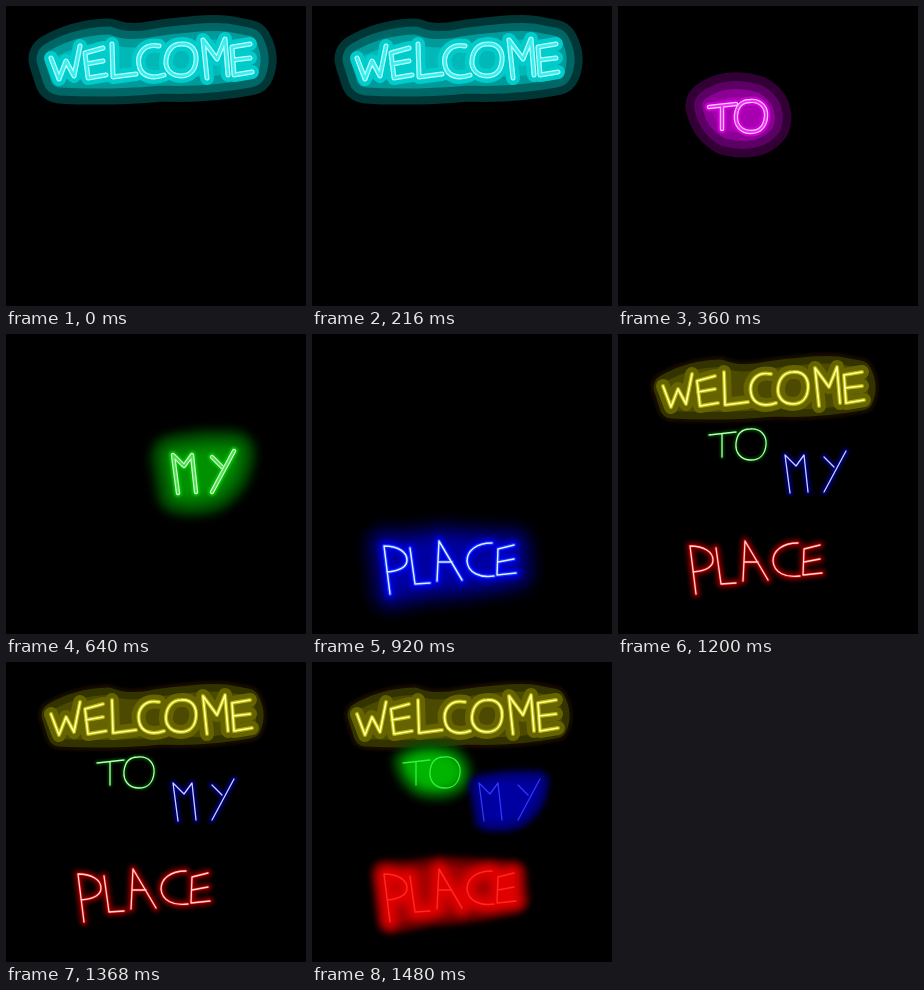
Animation of 300x300 px, one loop 1760 ms. Source, as an HTML page:

```html
<!DOCTYPE html>
<html lang="en">
<head>
<meta charset="utf-8">
<title>Neon sign</title>
<style>
html, body { margin: 0; width: 100%; height: 100%; overflow: hidden; background: #000; }
svg { display: block; width: 100vw; height: 100vh; }
path { fill: none; stroke-linecap: round; stroke-linejoin: round; }
</style>
</head>
<body>
<svg id="stage" viewBox="0 0 300 300"></svg>
<script>
const NS = 'http://www.w3.org/2000/svg';
const LOOP = 1760;
const stage = document.getElementById('stage');

// The lines of each word, and the outline its halo grows from
const words = {
  welcome: {
    line: 'M45 52L53 73L60 55L68 70L74 40' +
      'M97 42L79 47L82 72L100 69M80 58L97 55' +
      'M106 38L107 71L130 68' +
      'M153 40C137 37 131 49 133 59C135 71 147 73 158 69' +
      'M175 38C186 37 191 45 190 55C189 65 183 70 175 70C165 70 159 63 160 54C161 44 167 38 175 38Z' +
      'M201 72L197 34L211 53L219 33L222 69' +
      'M244 38L226 41L228 69L246 66M227 54L244 52',
    halo: 'M48 53Q72 39 102 38Q122 46 150 40Q200 33 220 35L241 39Q248 52 243 64Q200 72 155 70Q100 75 54 72Z'
  },
  to: {
    line: 'M91 101L118 98M104 100L104 123' +
      'M132 95C143 94 149 102 148 111C147 121 141 126 133 126C123 126 117 119 118 109C119 100 124 95 132 95Z',
    halo: 'M93 100Q110 87 137 95Q151 103 147 117Q137 130 110 124Q97 117 93 100Z'
  },
  my: {
    line: 'M172 159L167 121L178 132L186 121L190 158M206 123L216 133M228 117L206 158',
    halo: 'M167 123Q195 117 227 119Q225 144 206 156Q190 162 173 158Z'
  },
  place: {
    line: 'M78 260L72 212C86 212 95 218 95 226C95 234 86 237 75 238' +
      'M98 214L103 250L118 249' +
      'M125 247L127 207L150 246M126 228L140 228' +
      'M180 209C164 209 155 217 155 227C156 239 168 244 182 242' +
      'M202 211L186 215L185 241L204 239M186 228L202 225',
    halo: 'M73 212Q100 214 127 208Q165 211 201 212L203 238Q160 248 118 250L79 258Z'
  }
};

// Halo layers: reach, colour, blur. Line layers: width, colour, blur.
const yellowSign = {
  halo: [[16, '#140a00', 1], [12.5, '#333300', 0], [5, '#4c4a00', 0]],
  line: [[14, '#666400', 0], [4, '#b8b400', 0.5], [1.7, '#ffffa8', 0]]
};
const scenes = [
  { at: 0, signs: {
    welcome: {
      halo: [[25.5, '#003636', 0], [17.5, '#006666', 0], [9.5, '#009a9a', 0], [1, '#00b8b8', 0]],
      line: [[14, '#00cccc', 0], [5, '#c0ffff', 0], [2.6, '#38eeee', 0]]
    }
  } },
  { at: 360, signs: {
    to: {
      halo: [[25.5, '#330036', 0], [17, '#5c0066', 0], [9, '#8c0096', 0], [1, '#a800b0', 0]],
      line: [[9, '#c800d0', 0], [4.4, '#ffd0ff', 0], [2.2, '#f030f8', 0]]
    }
  } },
  { at: 640, signs: {
    my: {
      halo: [[23, '#003c00', 5], [14, '#006c00', 5], [4, '#009000', 5]],
      line: [[8, '#08bc08', 1], [4.4, '#d0ffd0', 0], [2, '#50dc50', 0]]
    }
  } },
  { at: 920, signs: {
    place: {
      halo: [[22, '#000038', 6], [12, '#000078', 5], [2, '#0000a0', 5]],
      line: [[10, '#0000d8', 2], [4, '#1030ff', 0.5], [1.5, '#e4f0ff', 0]]
    }
  } },
  { at: 1200, signs: {
    welcome: yellowSign,
    to: { line: [[4, '#004800', 1], [1.3, '#b8ffb8', 0]] },
    my: { line: [[6, '#000078', 1.8], [1.3, '#c8d4ff', 0]] },
    place: { line: [[8, '#700000', 2], [3, '#c80000', 0.6], [1.3, '#ffdcd8', 0]] }
  } },
  { at: 1480, signs: {
    welcome: yellowSign,
    to: {
      halo: [[12, '#005000', 4], [3, '#008c00', 4], [-7, '#00b400', 4]],
      line: [[1.3, '#30f040', 0]]
    },
    my: {
      halo: [[10, '#000070', 3], [2, '#0000a0', 4]],
      line: [[1.3, '#3038ff', 0]]
    },
    place: {
      halo: [[14, '#580000', 3], [6, '#a00000', 4]],
      line: [[14, '#e00000', 4], [1.5, '#ff2820', 0]]
    }
  } }
];

function add(parent, tag, attrs) {
  const el = document.createElementNS(NS, tag);
  for (const key in attrs) el.setAttribute(key, attrs[key]);
  return parent.appendChild(el);
}

const blurs = new Set();
function blur(size) {
  const id = 'blur' + String(size).replace('.', '_');
  if (!blurs.has(id)) {
    blurs.add(id);
    const filter = add(stage, 'filter', { id, filterUnits: 'userSpaceOnUse',
      x: 0, y: 0, width: 300, height: 300, 'color-interpolation-filters': 'sRGB' });
    add(filter, 'feGaussianBlur', { stdDeviation: size });
  }
  return `url(#${id})`;
}

function addLayer(group, d, width, colour, soft, fill = 'none') {
  const path = add(group, 'path', { d, stroke: colour, 'stroke-width': width });
  path.style.fill = fill;
  if (soft) path.setAttribute('filter', blur(soft));
}

const groups = scenes.map(({ signs }) => {
  const group = add(stage, 'g', { visibility: 'hidden' });
  for (const [word, { halo = [], line }] of Object.entries(signs)) {
    for (const [reach, colour, soft] of halo)
      addLayer(group, words[word].halo, Math.max(0, reach * 2), colour, soft, colour);
    for (const [width, colour, soft] of line)
      addLayer(group, words[word].line, width, colour, soft);
  }
  return group;
});

function draw() {
  const time = performance.now() % LOOP;
  const current = scenes.filter(scene => scene.at <= time).length - 1;
  groups.forEach((group, i) =>
    group.setAttribute('visibility', i === current ? 'visible' : 'hidden'));
  requestAnimationFrame(draw);
}
draw();
</script>
</body>
</html>
```
